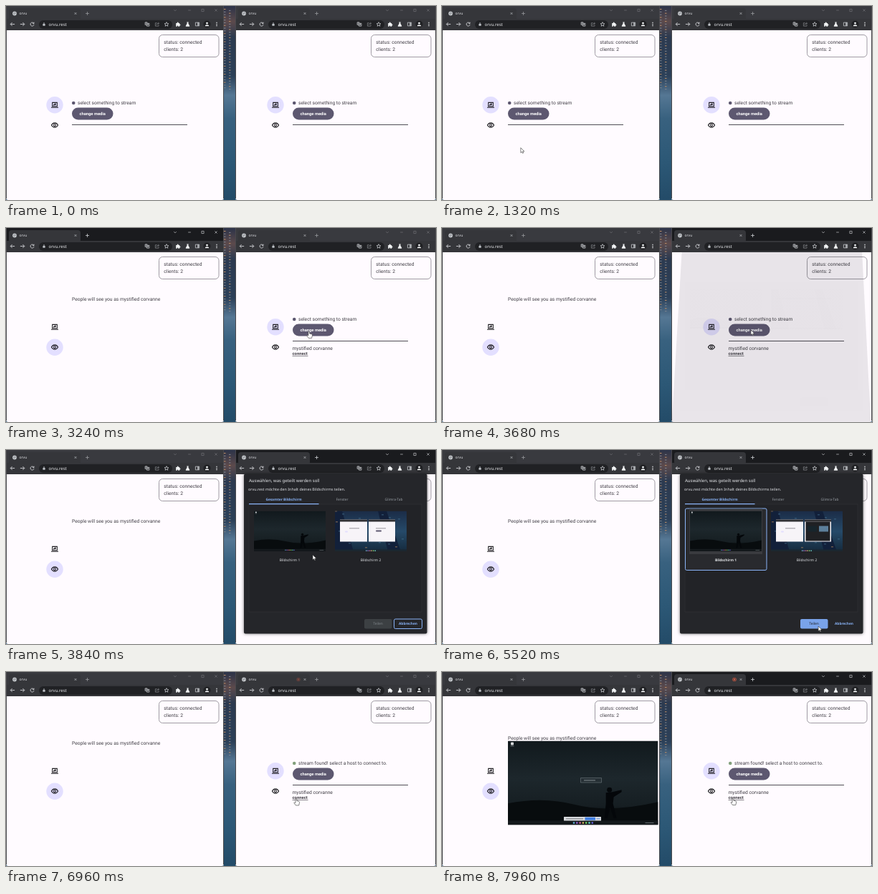
Write an HTML page with a canvas that moves like this. It is 600 by 272 pixels and loops after 8 s.

```html
<!DOCTYPE html>
<html lang="en">
<head>
<meta charset="utf-8">
<title>Screen sharing</title>
<style>
html, body { margin: 0; width: 100%; height: 100%; overflow: hidden; background: #fffbff }
canvas { display: block; width: 600px; height: 272px }
</style>
</head>
<body>
<canvas id="stage"></canvas>
<script>
const LOOP = 8000, APP = 'orvu', NAME = 'mystified corvanne';
const UI = '"Noto Sans", sans-serif', BODY = 'Roboto, sans-serif';
const INK = '#403e45', ACCENT = '#5d5870', LILAC = '#e3dfff', BLUE = '#8ab4f8';
const canvas = document.getElementById('stage');
const dpr = window.devicePixelRatio || 1;
canvas.width = 600 * dpr;
canvas.height = 272 * dpr;
const c = canvas.getContext('2d');
c.textRendering = 'geometricPrecision';

const clamp = v => Math.max(0, Math.min(1, v));
const ramp = (t, from, to) => clamp((t - from) / (to - from));
const ease = p => p * p * (3 - 2 * p);
const mix = (a, b, p) => a + (b - a) * p;

function box(x, y, w, h, fill, r = 0, stroke, line = 0.8) {
  c.beginPath();
  c.roundRect(x, y, w, h, r);
  if (fill) { c.fillStyle = fill; c.fill(); }
  if (stroke) { c.strokeStyle = stroke; c.lineWidth = line; c.stroke(); }
}
function dot(x, y, r, fill) {
  c.beginPath();
  c.arc(x, y, r, 0, 7);
  c.fillStyle = fill;
  c.fill();
}
function text(str, x, y, size, color, { font = BODY, weight = 400, align = 'left' } = {}) {
  c.font = `${weight} ${size}px ${font}`;
  c.textAlign = align;
  c.textBaseline = 'alphabetic';
  c.fillStyle = color;
  c.fillText(str, x, y + size * 0.36);
}
// Draws a path from a 24-unit grid, centred on x, y.
function icon(d, x, y, size, color, filled) {
  const path = new Path2D(d), k = size / 24;
  c.save();
  c.translate(x - size / 2, y - size / 2);
  c.scale(k, k);
  c.fillStyle = c.strokeStyle = color;
  c.lineWidth = 2.5;
  filled ? c.fill(path) : c.stroke(path);
  c.restore();
}
function faded(alpha, draw) {
  if (alpha <= 0) return;
  c.save();
  c.globalAlpha = alpha;
  draw();
  c.restore();
}
function inFrame(x, y, w, h, unitsWide, draw) {
  c.save();
  c.beginPath();
  c.rect(x, y, w, h);
  c.clip();
  c.translate(x, y);
  c.scale(w / unitsWide, w / unitsWide);
  draw();
  c.restore();
}
function gradient(h, ...stops) {
  const g = c.createLinearGradient(0, 0, 0, h);
  stops.forEach(([at, color]) => g.addColorStop(at, color));
  return g;
}

const ICONS = {
  back: 'M22 12H4M11 4L3 12L11 20',
  forward: 'M2 12H20M13 4L21 12L13 20',
  reload: 'M19 8A8 8 0 1 0 20 14M20 3V9H14',
  close: 'M5 5L19 19M19 5L5 19',
  plus: 'M12 3V21M3 12H21',
  chevron: 'M4 8L12 16L20 8',
  minimise: 'M4 12H20',
  maximise: 'M5 5H19V19H5Z',
  lock: 'M5 10H19V22H5ZM8 10V6Q8 2 12 2T16 6V10H14V6Q14 4 12 4T10 6V10Z',
  globe: 'M3 9L10 12L9 20M14 3L13 8L21 13',
  translate: 'M2 3H12V15H2ZM12 8H22V21H10V15M5 7H9M7 6V12M14 12H19M16 11V18',
  share: 'M11 6H3V21H19V15M8 16Q9 8 20 8M16 3L21 8L16 13',
  star: 'M12 2L15 9L22 9.5L16.5 14L18.5 21.5L12 17.5L5.5 21.5L7.5 14L2 9.5L9 9Z',
  puzzle: 'M3 7H8Q7 2 11 2T14 7H19V12Q23 11 23 15T19 18V22H13Q13 18 10.5 18T8 22H3Z',
  flask: 'M8 2H16V4H15V9L21 20Q21 22 19 22H5Q3 22 3 20L9 9V4H8Z',
  panel: 'M3 4H21V20H3ZM14 4V20M17 4V20',
  person: 'M12 3A4.5 4.5 0 1 1 12 12A4.5 4.5 0 1 1 12 3M3 21Q3 14 12 14T21 21Z',
  menu: 'M10 3H14V7H10ZM10 10H14V14H10ZM10 17H14V21H10Z',
  screen: 'M4 4H20V17H4ZM0 20.5H24M8 14Q8 10 15 10M12 7L15.5 10L12 13',
  eye: 'M1 12Q5 4.5 12 4.5T23 12Q19 19.5 12 19.5T1 12ZM12 8.5A3.5 3.5 0 1 1 12 15.5A3.5 3.5 0 1 1 12 8.5',
};

function browser(x, w, active, recording) {
  const light = active ? '#e8eaed' : '#a3a5a9', right = x + w;
  box(x, 0, w, 272, '#fffbff', [0, 0, 3, 3]);
  box(x, 0, w, 19, active ? '#1a1b1e' : '#393a3f');
  box(x + 4, 3, 100, 18, '#35363a', 4);
  box(x, 18, w, 16, '#35363a');
  box(x, 0, 1, 270, '#48484c');
  box(right - 1, 0, 1, 270, '#48484c');
  dot(x + 12, 10.5, 2.9, '#c4c7cb');
  icon(ICONS.globe, x + 12, 10.5, 5.5, '#5f6368');
  text(APP, x + 18.5, 10.5, 5, '#dfe1e5', { font: UI });
  if (recording !== null) faded(recording, () => {
    dot(x + 88, 10.5, 2.8, '#b5533f');
    dot(x + 88, 10.5, 1.9, '#35363a');
    dot(x + 88, 10.5, 1.2, '#d9634a');
  });
  icon(ICONS.close, x + 97, 10.5, 5, '#dfe1e5');
  icon(ICONS.plus, x + 113.5, 10.5, 6.5, light);
  [['chevron', 68], ['minimise', 48], ['maximise', 29.5], ['close', 11]]
    .forEach(([name, from]) => icon(ICONS[name], right - from, 6, 5.5, active ? '#e8eaed' : '#7b7c81'));
  [['back', 9], ['forward', 23], ['reload', 36.5]]
    .forEach(([name, at]) => icon(ICONS[name], x + at, 25.5, 7.5, '#e8eaed'));
  box(x + 46, 20, w - 118, 12, '#202124', 6);
  icon(ICONS.lock, x + 53, 25.5, 5.5, '#bdc1c6', true);
  text(APP + '.rest', x + 59.5, 25.5, 6, '#e8eaed', { font: UI });
  [['translate', 107], ['share', 93], ['star', 80], ['panel', 37]]
    .forEach(([name, from]) => icon(ICONS[name], right - from, 25.5, 7, name === 'share' ? '#85888c' : '#d5d8dc'));
  dot(right - 23.5, 25.5, 5, '#202124');
  [['puzzle', 64], ['flask', 50.5], ['person', 23.5], ['menu', 10]]
    .forEach(([name, from]) => icon(ICONS[name], right - from, 25.5, 7.5, '#f1f3f4', true));

  box(right - 90.5, 40.5, 83.5, 31, null, 5, '#87838c');
  text('status: connected', right - 83.7, 50.3, 6.7, INK);
  text('clients: 2', right - 83.7, 60.5, 6.7, INK);
}

function sidebar(x, watching) {
  faded(1 - watching, () => dot(x, 138.7, 11.7, LILAC));
  faded(watching, () => dot(x, 167.3, 11.7, LILAC));
  icon(ICONS.screen, x, 138.7, 10, '#1c1b1f');
  icon(ICONS.eye, x, 167, 10, '#1c1b1f');
}

function hostPane(x, listed, streaming) {
  const dy = listed ? 0 : 8;
  dot(x + 2.2, 128 + dy, 2.3, streaming ? '#82a07c' : ACCENT);
  text(streaming ? 'stream found! select a host to connect to.' : 'select something to stream',
    x + 8, 127.8 + dy, 6.7, INK);
  box(x, 134.6 + dy, 57.5, 17, ACCENT, 8.5);
  text('change media', x + 28.7, 143 + dy, 5.75, '#fff', { weight: 700, align: 'center' });
  box(x, 158 + dy, 161, 1, '#4f4d54');
  if (!listed) return;
  text(NAME, x - 0.5, 169, 6.7, INK);
  text('connect', x - 0.5, 176.3, 5.9, INK, { weight: 700 });
  box(x - 0.5, 179, 22, 0.6, INK);
}

function nightScene(x, y, w, h) {
  inFrame(x, y, w, h, 210, () => {
    box(0, 0, 210, 118, gradient(118, [0, '#11191d'], [0.45, '#1d272c'], [0.78, '#161e22'], [0.85, '#0b1013'], [1, '#080c0e']));
    c.fillStyle = '#080c0e';
    c.fill(new Path2D('M0 88Q50 78 95 90T210 86V118H0Z'));
    dot(142, 69, 3.5, '#04070a');
    c.fill(new Path2D('M137 73L146 72L159 69V72L148 79L147 88L152 109H148L143 94L139 109H135L137 88Z'));
    box(4, 2, 4, 4, '#d5d8da', 1);
    box(3.5, 7, 5, 0.8, '#8a8f92');
    box(0, 112, 210, 6, '#14191c');
    for (let i = 0; i < 7; i++)
      box(91 + i * 4.3, 114, 2.5, 2.5, `hsl(${i * 67 + 200} 55% 60%)`, 0.5);
    box(192, 115, 12, 0.8, '#7c8488');
  });
}

function cityScene(x, y, w, h, dialogShown) {
  inFrame(x, y, w, h, 100, () => {
    box(0, 0, 100, 57, gradient(57, [0, '#1b2c47'], [0.5, '#264a69'], [1, '#152a3d']));
    c.fillStyle = '#12203a';
    c.fill(new Path2D('M10 0L26 57H0V0ZM60 0L72 0L92 57H74Z'));
    for (let i = 0; i < 24; i++)
      box((i * 37) % 97, (i * 23) % 52, 3, 0.7, i % 3 ? '#43708e' : '#b98a5c');
    box(7, 12, 38, 31, '#f7f4f8');
    box(7, 12, 38, 3, '#303134');
    box(47, 12, 37, 31, '#f7f4f8');
    box(47, 12, 37, 3, '#303134');
    box(14, 28, 4, 2, LILAC, 1);
    box(20, 24, 14, 0.8, '#77747c');
    if (dialogShown) {
      box(48.5, 15, 34, 27, '#202124');
      box(51, 21, 13, 8, '#17252c');
      box(67, 21, 13, 8, '#5c7f9a');
    } else {
      box(57, 24, 14, 0.8, '#77747c');
      box(57, 27, 8, 2, ACCENT, 1);
    }
    box(0, 54, 100, 3, '#1b2730');
    for (let i = 0; i < 6; i++) box(43 + i * 2.5, 55, 1.4, 1.4, `hsl(${i * 67 + 200} 55% 65%)`);
  });
}

function dialog(selected, refreshed, pressed) {
  const ui = { font: UI }, mid = { font: UI, align: 'center' }, bold = { ...mid, weight: 600 };
  c.save();
  c.shadowColor = '#0008';
  c.shadowBlur = 4 * dpr;
  box(332, 33.5, 255.5, 224, '#25262a', 2);
  c.restore();
  text('Auswählen, was geteilt werden soll', 339, 43, 6, '#e8eaed', ui);
  text(APP + '.rest möchte den Inhalt deines Bildschirms teilen.', 338, 55, 5.35, '#dfe1e5', ui);
  text('Gesamter Bildschirm', 387.5, 69, 4.8, BLUE, bold);
  text('Fenster', 469, 69, 4.9, '#9aa0a6', mid);
  text('Glimra-Tab', 541, 69, 4.9, '#9aa0a6', mid);
  box(339, 76, 241, 151, '#222327', 0, '#35363a', 0.5);
  box(339, 75, 97.5, 1.2, BLUE);
  if (selected) {
    box(339.5, 82, 113.5, 86.5, '#292a2e', 2, BLUE, 1);
    box(345, 82.6, 102, 63.5, '#3a3b3f');
  }
  nightScene(346, 85.5, 100, 56.5);
  cityScene(459, 85.5, 100, 56.5, refreshed);
  text('Bildschirm 1', 396, 154, 4.9, '#e8eaed', selected ? bold : mid);
  text('Bildschirm 2', 509, 154, 4.9, '#e8eaed', mid);
  box(500, 237, 38.5, 13.5, selected ? (pressed ? '#79a3ea' : BLUE) : '#3c4043', 2);
  text('Teilen', 519, 243.7, 4.9, selected ? '#202124' : '#80868b', mid);
  box(541.5, 237, 39, 13.5, null, 2, selected ? null : BLUE, 1);
  text('Abbrechen', 561, 243.7, 4.8, BLUE, bold);
}

// A see-through sheet that settles into the dialog's outline.
function openingSheet(p) {
  c.fillStyle = '#25262a';
  c.beginPath();
  c.moveTo(mix(335, 332, p), 34);
  c.lineTo(mix(586, 587, p), 34);
  c.lineTo(mix(600, 587, p), mix(274, 257, p));
  c.lineTo(mix(319, 332, p), mix(274, 257, p));
  c.fill();
}

function sharedVideo() {
  nightScene(92, 96.5, 209.5, 118);
  box(193.5, 148.5, 29, 6.5, '#2a3439aa', 0, '#7f8a8f', 0.5);
  box(198, 151.5, 16, 0.8, '#9aa4a8');
  box(170, 203, 52, 5.5, '#d8dadd', 0.5);
  box(173, 205.4, 24, 0.8, '#5f6368');
  box(199.5, 203.8, 14.5, 4, '#3f7de0', 0.5);
  box(215.5, 205.4, 5, 0.8, '#3f7de0');
}

function wallpaper() {
  box(0, 0, 600, 272, '#244c69');
  box(304, 0, 16, 272, gradient(272, [0, '#2c3348'], [0.08, '#5c4a4c'], [0.16, '#2c3a50'],
    [0.36, '#2c4058'], [0.46, '#557794'], [0.58, '#38617f'], [0.8, '#2c5876'], [1, '#234b68']));
  for (let i = 0; i < 60; i++)
    box(304 + (i * 7) % 14, 4 + i * 1.9, 2.5, 1, i % 3 ? '#7d8590' : '#c08f66');
}

// time, x, y
const PATH = [
  [120, 186, 274], [320, 170, 247], [960, 170, 247], [1600, 69, 166], [2200, 69, 166],
  [2320, 126, 197], [2400, 158, 205], [2560, 158, 205], [3320, 431, 143], [3720, 431, 143],
  [3840, 428, 147], [4240, 434, 134], [4360, 397, 110], [4640, 397, 110], [5320, 525, 247],
  [6200, 525.5, 247], [6720, 384, 186], [7000, 406, 177],
];
const ARROW = new Path2D('M0 0V7L1.7 5.5L2.6 7.7L3.8 7.2L2.8 5.1H5Z');
const HAND = new Path2D('M-.9 .6Q0 -.6 .9 .6V3.2L4 4Q4.9 4.4 4.6 6L3.8 9.5H-.5L-3 6Q-2.8 4.6 -.9 6Z');

function cursor(t) {
  if (t < PATH[0][0]) return;
  let i = PATH.findIndex(key => key[0] > t);
  if (i < 0) i = PATH.length - 1;
  const [t0, x0, y0] = PATH[i - 1], [t1, x1, y1] = PATH[i];
  const p = ease(ramp(t, t0, t1));
  const hand = (t > 1500 && t < 2240) || (t > 3240 && t < 3600) || t > 6940;
  c.save();
  c.translate(mix(x0, x1, p), mix(y0, y1, p));
  c.fillStyle = '#fff';
  c.strokeStyle = '#333';
  c.lineWidth = 0.6;
  c.lineJoin = 'round';
  c.fill(hand ? HAND : ARROW);
  c.stroke(hand ? HAND : ARROW);
  c.restore();
}

function draw(t) {
  c.setTransform(dpr, 0, 0, dpr, 0, 0);
  wallpaper();

  const watching = t >= 1800, playing = t >= 7400;
  browser(0, 304, t >= 1760 && t < 3520, null);
  sidebar(68, ramp(t, 1760, 1960));
  if (watching) text('People will see you as ' + NAME, 92, playing ? 92.8 : 99.8, 6.7, INK);
  else hostPane(92, false, false);
  if (playing) sharedVideo();

  const recording = t < 5840 ? null : 0.65 + 0.35 * Math.cos((t - 5840) / 1000 * Math.PI);
  browser(320, 280, (t >= 3520 && t < 5600) || t >= 7060, recording);
  sidebar(376, 0);
  hostPane(400, t >= 1880, t >= 5640);

  const opening = ramp(t, 3660, 3820), closing = ramp(t, 5560, 5660);
  if (opening < 1) faded(opening * 0.75, () => openingSheet(opening));
  faded(opening ** 3 * (1 - closing), () => dialog(t >= 4560, t >= 4640, t >= 5320));
  cursor(t);
}

function tick(now) {
  draw(now % LOOP);
  requestAnimationFrame(tick);
}
requestAnimationFrame(tick);
</script>
</body>
</html>
```
